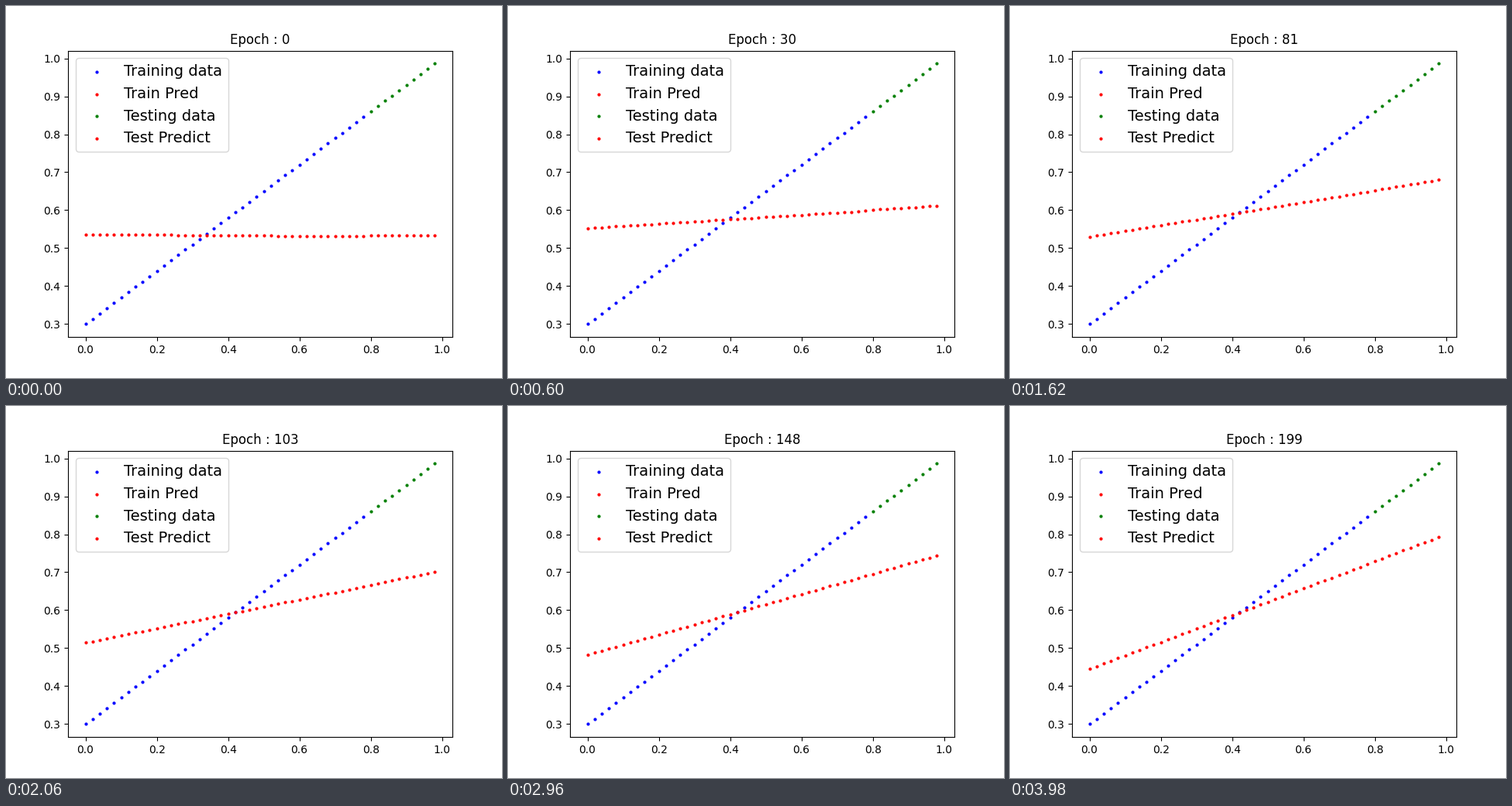
These frames come from a looping animation (640 px wide and 480 px high, 4 s). A matplotlib script:

```python
import matplotlib.pyplot as plt
import numpy as np
from matplotlib.animation import FuncAnimation

EPOCHS = 200
RATE = 0.01
START = (-0.00748682, 0.53644359)  # weight, bias

x = np.arange(50) * 0.02
y = 0.7 * x + 0.3
split = 40
x_train, y_train = x[:split], y[:split]
x_test, y_test = x[split:], y[split:]


def train():
    """Gradient descent on the mean absolute error; returns every state."""
    w, b = START
    states = [(w, b)]
    for _ in range(EPOCHS):
        sign = np.sign(w * x_train + b - y_train)
        w -= RATE * np.mean(sign * x_train)
        b -= RATE * np.mean(sign)
        states.append((w, b))
    return states


states = train()


def predict(xs, state):
    w, b = state
    return w * xs + b


fig, ax = plt.subplots(figsize=(6.4, 4.8), dpi=100)


def dots(xs, ys, color, label):
    return ax.scatter(xs, ys, s=4, c=color, label=label)


dots(x_train, y_train, "b", "Training data")
train_dots = dots(x_train, predict(x_train, states[0]), "r", "Train Pred")
dots(x_test, y_test, "g", "Testing data")
test_dots = dots(x_test, predict(x_test, states[1]), "r", "Test Predict")
ax.legend(loc="upper left", prop={"size": 14})
title = ax.set_title("Epoch : 0")


def update(epoch):
    # Training points show the line before the step, test points after it.
    train_line = predict(x_train, states[epoch])
    test_line = predict(x_test, states[epoch + 1])
    train_dots.set_offsets(np.column_stack([x_train, train_line]))
    test_dots.set_offsets(np.column_stack([x_test, test_line]))
    title.set_text(f"Epoch : {epoch}")
    return train_dots, test_dots, title


anim = FuncAnimation(fig, update, frames=EPOCHS, interval=20,
                     repeat=True, repeat_delay=0)
plt.show()
```
